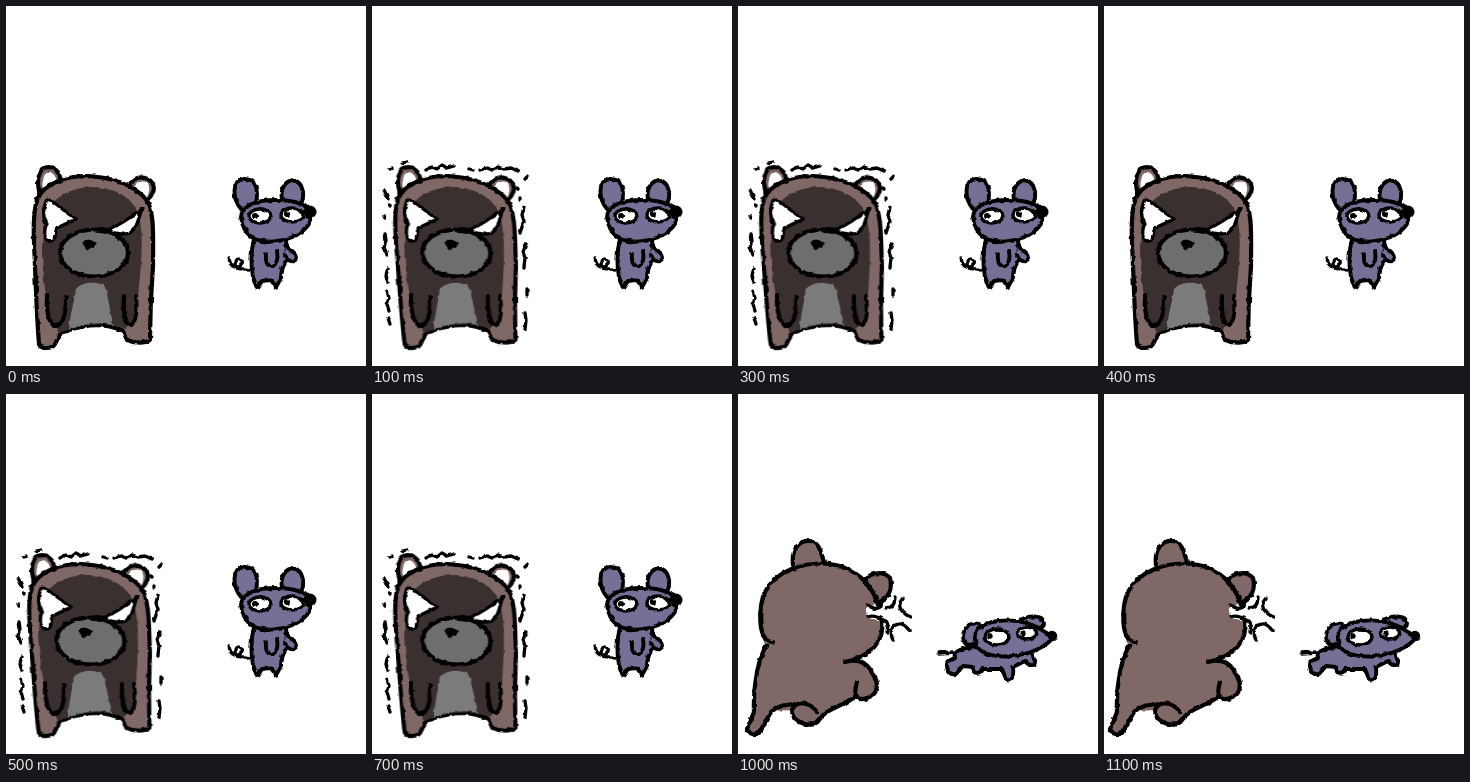
An HTML page that plays this animation: 360x360 px, repeating every 1.6 s.

```html
<!DOCTYPE html>
<html lang="en">
<head>
<meta charset="utf-8">
<title>Bear and mouse</title>
<style>
  html, body { margin: 0; width: 100%; height: 100%; overflow: hidden; background: #fff; }
  svg { display: block; width: 100vw; height: 100vh; }
  path, ellipse, circle { stroke: #000; stroke-width: 4.2; stroke-linejoin: round; stroke-linecap: round; fill: none; }
  .ink { filter: url(#rough); }
  .mouse > * { stroke-width: 3.9; }
  .brown { fill: #806866; }
  .dark { fill: #3b3030; stroke: none; }
  .muzzle { fill: #6e6e6e; }
  .belly { fill: #7b7b7b; stroke: none; }
  .purple { fill: #747096; }
  .white { fill: #fff; }
  .plain { stroke: none; }
  .mouse .thin, .thin { stroke-width: 3.3; }
  .black { fill: #000; stroke: none; }
  .paw { fill: #fbdcbc; }
  .palm { fill: #c4b4b2; }
  .tongue { fill: #ec8f83; }
  .burst { fill: #eedda4; stroke: none; }
  .flare { stroke: #ff7d59; stroke-width: 3.8; }

  .glare, .swing, .dodge { animation: 1.6s step-end infinite; }
  .glare { animation-name: glare; }
  .swing { animation-name: swing; }
  .dodge { animation-name: dodge; }
  .lean { animation: lean .2s step-end infinite; }
  .shiver { animation: shiver .2s step-end infinite; }
  .settle { animation: settle 1.6s step-end infinite; }

  @keyframes glare { 0% { opacity: 1 } 50%, 100% { opacity: 0 } }
  @keyframes swing { 0% { opacity: 0 } 50% { opacity: 1 } 62.5%, 100% { opacity: 0 } }
  @keyframes dodge { 0% { opacity: 0 } 62.5%, 100% { opacity: 1 } }
  @keyframes lean {
    0% { transform: none }
    50%, 100% { transform: matrix(1, 0, .035, 1, -12.2, 0) }
  }
  @keyframes shiver { 0% { opacity: 0 } 50%, 100% { opacity: 1 } }
  @keyframes settle { 0% { transform: translateX(3px) } 68.75%, 100% { transform: none } }
</style>
</head>
<body>
<svg viewBox="0 0 360 360">
  <defs>
    <filter id="rough" filterUnits="userSpaceOnUse" x="0" y="0" width="360" height="360" color-interpolation-filters="sRGB">
      <feTurbulence type="fractalNoise" baseFrequency=".2" numOctaves="1" seed="4"/>
      <feDisplacementMap in="SourceGraphic" scale="3.6" xChannelSelector="R" yChannelSelector="G"/>
    </filter>
  </defs>

  <g class="glare">
    <g class="lean"><g class="ink">
      <path class="brown" d="M34 188C29 172 34 161 43 161C51 162 55 168 54 177"/>
      <path class="white plain" d="M37 186C35 174 38 167 43 166C49 167 51 173 51 180Z"/>
      <path class="brown" d="M123 182C126 173 132 170 139 172C147 174 150 182 146 188C144 192 141 194 138 196"/>
      <path class="white plain" d="M126 185C129 177 135 174 140 176C146 181 143 189 137 194Z"/>
      <path class="brown" d="M33 338C31 315 30 285 29 260C28 235 26 210 31 194C38 177 60 170 82 170C104 171 126 178 139 192C149 203 147 230 147 260C145 285 144 310 144 334C138 338 128 337 121 334L117 325C99 316 77 319 60 325C49 328 53 337 46 341C40 343 34 342 33 338Z"/>
      <path class="dark" d="M40 290C36 262 34 236 39 211C44 192 65 181 87 181C111 182 130 193 134 214C138 240 134 270 131 300C130 315 126 319 119 323C98 315 75 318 53 327L50 320C43 312 41 302 40 290Z"/>
      <path class="belly" d="M70 283C77 275 95 275 100 282L107 319C91 315 76 318 62 324Z"/>
      <path d="M41 289C40 302 42 317 49 320C57 320 60 308 60 291"/>
      <path d="M118 290C117 304 119 320 125 319C131 316 131 302 130 289"/>
      <path class="white thin" d="M41 193C49 195 58 206 70 213L51 222C48 227 51 234 45 235C38 235 37 227 41 218C36 211 37 202 41 193Z"/>
      <path class="white thin" d="M136 203C132 214 131 222 124 227C117 229 109 228 102 224C114 219 124 212 136 203Z"/>
      <ellipse class="muzzle" cx="88" cy="247" rx="34" ry="23.5"/>
      <path class="black" d="M76 236C80 232 88 234 90 238C88 242 84 244 80 243Z"/>
    </g></g>

    <g class="shiver"><g class="ink">
      <path class="thin" d="M18 163l2-1M30 157l5-1M54 164l6-3l5 2l5-4l5 3l7-2M97 163l4 1M108 164l7-2l5 2l6-3l6 2l7-1l7 3M12 184l4 8M18 199v1M12 210l1 2M13 227l1 8l-2 6l3 8M16 262l-2 7l2 8M15 285l2 7l-2 6l2 7M16 312l2 6M156 170l-3 3M145 182l1 1M148 192v1M152 201l-2 8l2 6l-4 12M154 238l-3 8l2 6l-1 9M155 283v6M153 307l1 7l-1 10"/>
    </g></g>

    <g class="ink mouse">
      <path class="thin" d="M243 264C236 261 230 266 229 258C231 250 238 253 236 258C231 264 224 261 223 252"/>
      <path class="purple" d="M248 233C244 248 245 260 247 271L251 282L256 275L265 274L270 281L275 272C275 264 278 258 281 254L280 231Z"/>
      <path d="M260 248C259 257 262 261 267 260C272 257 272 251 271 245"/>
      <path class="purple" d="M280 239C283 245 291 246 291 252C287 258 281 255 279 249"/>
      <path class="purple" d="M235 203C226 192 226 175 237 173C249 172 253 181 250 198"/>
      <path class="purple" d="M276 194C274 183 279 175 287 174C297 176 300 189 294 200"/>
      <path class="purple" d="M235 211C236 198 253 194 270 194C289 194 303 199 305 208C306 223 290 232 272 235C250 238 237 230 235 211Z"/>
      <ellipse class="white thin" cx="254" cy="210" rx="11" ry="7"/>
      <ellipse class="white thin" cx="286" cy="209" rx="11" ry="7"/>
      <circle class="black" cx="249" cy="210" r="3"/>
      <circle class="black" cx="281" cy="208" r="3"/>
      <circle class="black" cx="304" cy="206" r="6.5"/>
    </g>
  </g>

  <g class="swing">
    <g class="ink">
      <path class="brown" d="M37 246C38 277 44 296 54 313L50 337C53 344 64 343 66 338L66 326C85 320 110 319 124 310C136 317 152 318 157 308C157 298 146 297 136 298C134 280 124 270 114 266L100 225L50 220Z"/>
      <path class="white plain" d="M115 275C124 273 131 283 134 298L134 309L122 309C112 304 106 290 115 275Z"/>
      <path class="white plain" d="M58 254L86 246C88 258 95 263 100 267L90 280C78 275 70 262 58 254Z"/>
      <path class="brown" d="M47 192C41 173 49 158 60 160C70 162 73 175 70 184"/>
      <path class="brown" d="M109 172C111 159 124 155 132 161C138 171 134 182 127 187"/>
      <path class="white plain" d="M115 173C116 164 124 160 129 164C134 171 131 179 126 184Z"/>
      <path class="brown" d="M29 200C33 189 44 185 54 182C72 170 102 162 122 177C134 186 143 199 147 215L128 252C115 267 95 264 86 248L38 250Z"/>
      <path class="white plain" d="M49 187C46 172 52 163 58 163C66 165 68 175 66 185C61 191 54 191 49 187Z"/>
      <path class="white" d="M128 226C135 218 146 216 155 221C161 236 153 254 139 255C129 256 121 246 125 234Z"/>
      <path class="white thin" d="M96 206C106 209 116 202 130 205C138 210 131 217 125 221C121 228 110 226 107 219C110 214 104 212 96 206Z"/>
      <circle class="black" cx="158" cy="215" r="6.5"/>
      <path d="M86 248C92 258 102 263 115 268"/>
      <path d="M107 266C118 264 124 259 132 253"/>
      <path d="M58 262C71 271 79 285 94 287L105 286"/>
      <path class="palm" d="M117 268C127 262 146 259 149 268C147 279 136 285 126 278"/>
      <path class="paw plain" d="M29 226L27 239L38 252L58 248Z"/>
      <path d="M31 201C26 215 28 225 30 235L43 249"/>
      <path class="paw" d="M37 208C39 196 54 193 68 197C86 203 96 222 92 234C84 245 64 251 47 246C37 237 34 222 37 208Z"/>
      <path class="thin" d="M42 203l7-1l3 6l-6 4l-5-4ZM56 200l7 0l0 7l-7 0ZM68 211l7-1l2 6l-5 5l-7-4ZM52 220l7-2l4 5l-4 6l-8-2ZM81 221l6 1l3 7l-6 3l-6-4ZM67 229l7-1l3 6l-6 4l-6-3Z"/>
      <path d="M149 179C156 178 160 183 166 181M164 166C171 171 177 165 178 157M186 157C180 168 186 176 195 178M162 194C170 188 179 187 179 194L175 203M181 182C180 188 187 193 193 192"/>
    </g>
    <g class="ink mouse">
      <path d="M243 249L229 245L235 239L214 236"/>
      <path class="purple" d="M246 207L243 216C234 210 226 213 229 219C234 224 240 223 244 226C242 236 244 244 243 250L238 261L247 259L257 252L284 255L292 260L300 257L292 247L293 228C303 228 310 221 306 215C300 211 295 216 290 216L284 205Z"/>
      <path class="purple" d="M226 183L221 140L228 150L233 141L238 150L243 139L248 171"/>
      <path class="purple" d="M267 169L274 153L277 139L282 150L288 140L287 176"/>
      <path class="purple" d="M224 196C222 181 238 168 255 165C270 164 280 170 287 173L300 172C311 176 304 193 296 201C284 211 264 211 247 210C233 208 226 204 224 196Z"/>
      <path class="tongue thin" d="M285 206L274 223L279 238L290 224Z"/>
      <circle class="white" cx="240" cy="189" r="12.5"/>
      <circle class="white" cx="276" cy="184" r="12.5"/>
      <circle class="black" cx="236" cy="189" r="3"/>
      <circle class="black" cx="273" cy="182" r="3"/>
      <circle class="black" cx="304" cy="173" r="6"/>
    </g>
    <g class="ink">
      <path class="burst" d="M304 121L318 133L336 125L336 144L351 150L325 171L303 148Z"/>
      <path class="flare" d="M303 147L304 121L318 133L336 125L336 144L351 150L325 169"/>
    </g>
  </g>

  <g class="dodge">
    <g class="settle"><g class="ink">
      <path class="brown" d="M52 171C50 153 60 146 69 147C79 148 80 160 84 171"/>
      <path class="brown" d="M120 190C127 178 142 176 149 184C152 195 147 205 138 208"/>
      <path class="brown plain" d="M25 252C16 236 18 210 24 198C34 178 60 167 90 170C115 174 130 190 134 210L125 216L127 224L141 227C143 245 135 262 104 268C117 264 128 270 131 279C139 289 138 301 126 304L115 304C104 312 84 314 76 330C66 332 54 326 53 316L30 317L18 340L6 336L12 318C12 294 16 268 25 252Z"/>
      <path d="M32 248C16 249 17 212 24 198C34 178 60 167 90 170C115 174 131 190 137 211"/>
      <path d="M25 252C16 268 12 294 13 318L6 335C8 341 15 341 18 339L30 318C36 312 44 311 53 310"/>
      <path d="M141 227C144 246 130 263 104 268C117 264 128 270 131 279C139 289 137 301 126 304C118 307 111 304 116 288M116 301C105 312 85 313 75 329C64 334 51 326 51 316C55 306 69 308 76 318"/>
      <path class="white plain" d="M125 214L139 213L143 225L126 224Z"/>
      <path class="thin" d="M126 211C134 216 142 216 140 207M127 223C134 220 140 225 144 227M145 214C152 214 154 209 154 203M162 204C155 212 160 219 170 223M145 227C149 231 146 234 146 238M152 247C148 236 151 231 158 230C163 229 165 233 168 236"/>
    </g></g>
    <g class="settle"><g class="ink mouse">
      <path class="thin" d="M197 259L214 258"/>
      <path class="purple" d="M240 253C224 253 211 256 214 264L207 267C204 273 208 282 215 280L222 272L232 273C231 281 239 280 241 275L261 275L265 285C271 287 273 283 272 273L284 267C288 273 295 272 294 267C291 263 294 258 285 256Z"/>
      <path class="purple" d="M276 228C286 221 302 220 303 229C303 235 297 234 292 233"/>
      <path class="purple" d="M238 230C224 227 219 242 224 249C229 253 235 249 238 245"/>
      <path class="purple" d="M234 247C232 234 243 229 257 227C281 224 295 232 304 238L312 243C306 253 289 260 272 262C253 264 236 260 234 247Z"/>
      <ellipse class="white thin" cx="256" cy="243" rx="12" ry="8"/>
      <ellipse class="white thin" cx="286" cy="239" rx="9.5" ry="6"/>
      <circle class="black" cx="249" cy="242" r="2.7"/>
      <circle class="black" cx="282" cy="240" r="2.7"/>
      <circle class="black" cx="311" cy="242" r="5.2"/>
    </g></g>
  </g>
</svg>
</body>
</html>
```
